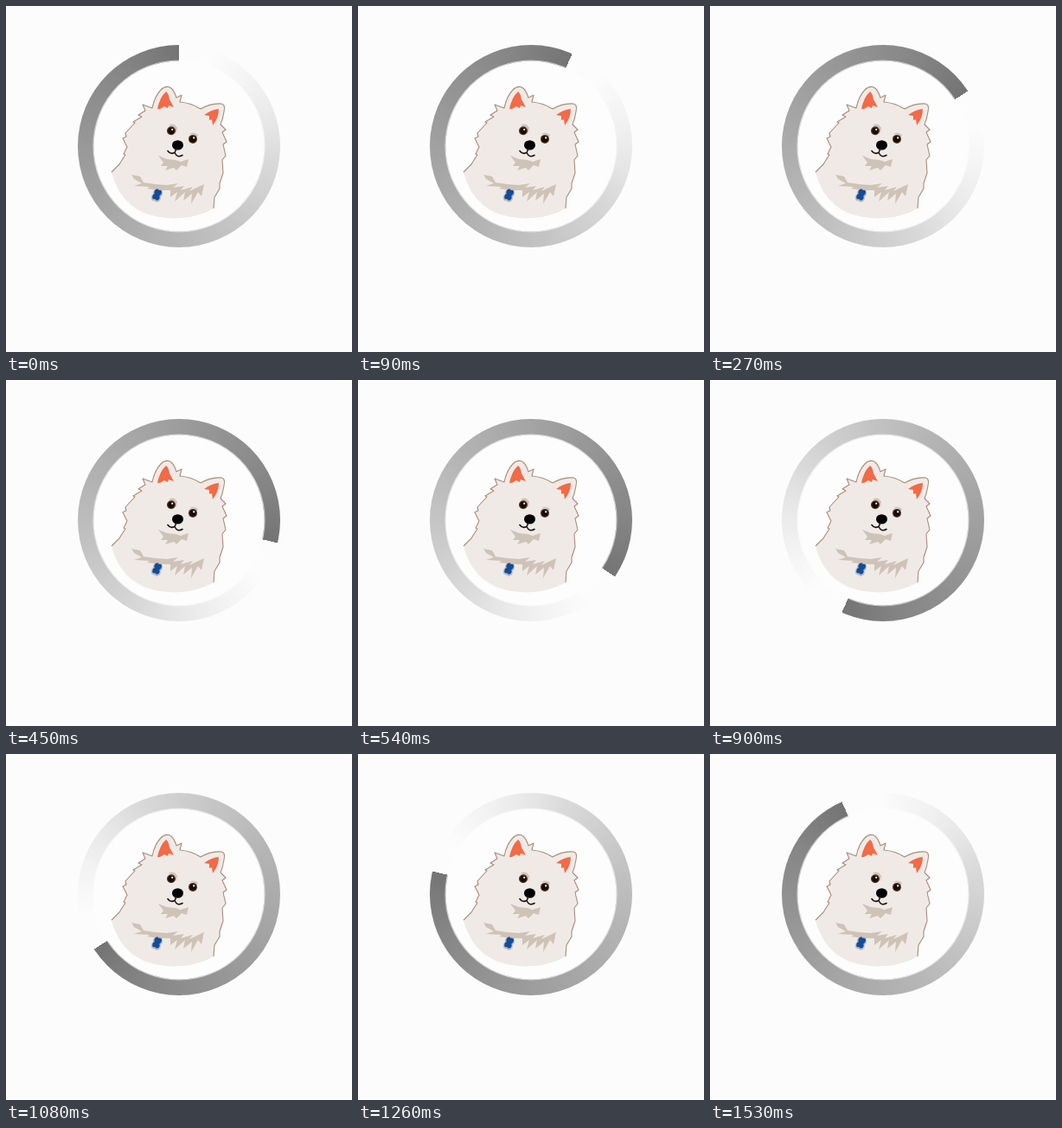
Write an HTML page that moves like this. It is 400x400 px and loops after 1.62 s.

```html
<!DOCTYPE html>
<html lang="en">
<head>
<meta charset="utf-8">
<title>Dog loader</title>
<style>
  html, body { margin: 0; width: 100%; height: 100%; overflow: hidden; background: #fcfcfc; }
  #ring { position: absolute; left: 83px; top: 45px; width: 234px; height: 234px; border-radius: 50%; }
  svg { position: absolute; left: 0; top: 0; display: block; }
</style>
</head>
<body>
<div id="ring"></div>
<svg width="400" height="400" viewBox="0 0 400 400">
  <circle cx="200" cy="162" r="98.5" fill="#fdfdfd"/>
  <circle cx="200" cy="162" r="99" fill="none" stroke="#fff" stroke-width="1.2" opacity=".6"/>

  <!-- body -->
  <path id="body" fill="#f0eae6"/>
  <path id="outline" fill="none" stroke="#a88c7a" stroke-width="1.1" stroke-linejoin="round"/>

  <!-- ears -->
  <g fill="#f26a48">
    <path d="M175 119 Q178 105 185 99 Q188 101 189 108 L194 117 L188 115 L187 118 L183 116 L178 119 Z"/>
    <path d="M229 126 Q237 120 246 119 Q246 129 239 138 L238 131 L235 132 L235 127 Z"/>
  </g>

  <!-- fur shadows -->
  <g fill="#cfc3b7">
    <path d="M176 173 L186 177 L196 178 L202 180 L211 177 L209 186 L203 184 L197 190 L194 187 L184 190 L187 185 L179 185 L182 181 Z"/>
    <path d="M145 195 L155 197 L159 204 L172 206 L186 207 L199 205 L193 210 L206 208 L202 213 L216 209 L212 214 L229 206 L226 220 L222 215 L214 229 L215 217 L205 225 L207 215 L195 226 L198 215 L190 221 L190 213 L178 213 L163 211 L166 209 L148 208 L157 205 L148 200 Z"/>
    <path d="M188 138 Q194 134 198 141 L197 147 Q194 139 188 138 Z"/>
    <path d="M211 149 Q216 144 222 149 L221 151 Q216 147 211 149 Z"/>
  </g>

  <!-- face -->
  <g id="eyes"></g>
  <ellipse cx="198.5" cy="160.9" rx="6.5" ry="5.7"/>
  <path fill="none" stroke="#1c1311" stroke-width="1.6" stroke-linecap="round" d="M197 165 L195 169.5 Q190 172 187 167.5 M195 169.5 Q198 176 204 172.5"/>

  <!-- tag -->
  <g transform="translate(.6 .6) rotate(22 174 217.5)">
    <path id="rim" fill="#b9bdc3" stroke="#b9bdc3" stroke-width="2.6" transform="translate(.2 .8)"/>
    <path id="bone" fill="#124c98"/>
  </g>
</svg>
<script>
  const $ = id => document.getElementById(id);
  const LOOP = 1620, STEP = 90;
  // direction of the hard edge at each step, clockwise from the top
  const turns = [0, 24, 45, 57, 79, 103, 124, 135, 156, 180, 204, 225, 237, 260, 283, 304, 315, 336];
  const shades = "#fcfcfc 0deg, #fcfcfc 20deg, #f3f3f3 48deg, #e6e6e6 78deg, #d9d9d9 100deg, " +
    "#c3c3c3 150deg, #b5b5b5 185deg, #9b9b9b 262deg, #858585 325deg, #747474 360deg";

  const fur = "M122 192 L131 183 L138 172 L136 171 L140 163 L135 153 L139 151 L138 147 " +
    "L149 135 L147 134 L157 128 L153 126 L161 121 L158 114 L169 118 " +
    "Q172 104 179 97 Q185 91 191 95 Q195 99 197 106 L203 103 L201 111 Q214 112 225 119 " +
    "Q237 112 249 113 Q254 114 252 122 Q251 130 248 137 L254 143 L250 146 L255 157 L251 160 " +
    "L254 173 L250 178 L251 193 L247 205 L247 211 L241 221 L240 234";
  $("outline").setAttribute("d", fur);
  $("body").setAttribute("d", fur + " C216 248 184 248 162 240 C141 232 128 215 122 192 Z");

  const eye = (x, y) =>
    `<circle cx="${x}" cy="${y}" r="5" fill="#51301f"/>` +
    `<circle cx="${x}" cy="${y}" r="3.6" fill="#150b09"/>` +
    `<circle cx="${x + 1.2}" cy="${y - 1.5}" r="1.1" fill="#fff"/>`;
  $("eyes").innerHTML = eye(191, 144.3) + eye(216, 153.9);

  const bone = "M170 213 Q172 210 174 212 Q177 210 178 213 Q179 216 177 217.5 " +
    "Q179 220 178 222 Q176 225 174 223 Q171 225 170 222 Q169 219 171 217.5 Q169 216 170 213 Z";
  $("rim").setAttribute("d", bone);
  $("bone").setAttribute("d", bone);

  let last = -1;
  function draw(t) {
    const i = Math.floor((t % LOOP) / STEP);
    if (i !== last) {
      $("ring").style.background = `conic-gradient(from ${turns[i]}deg, ${shades})`;
      last = i;
    }
  }

  const start = performance.now();
  function tick() {
    draw(performance.now() - start);
    requestAnimationFrame(tick);
  }
  tick();
</script>
</body>
</html>
```
